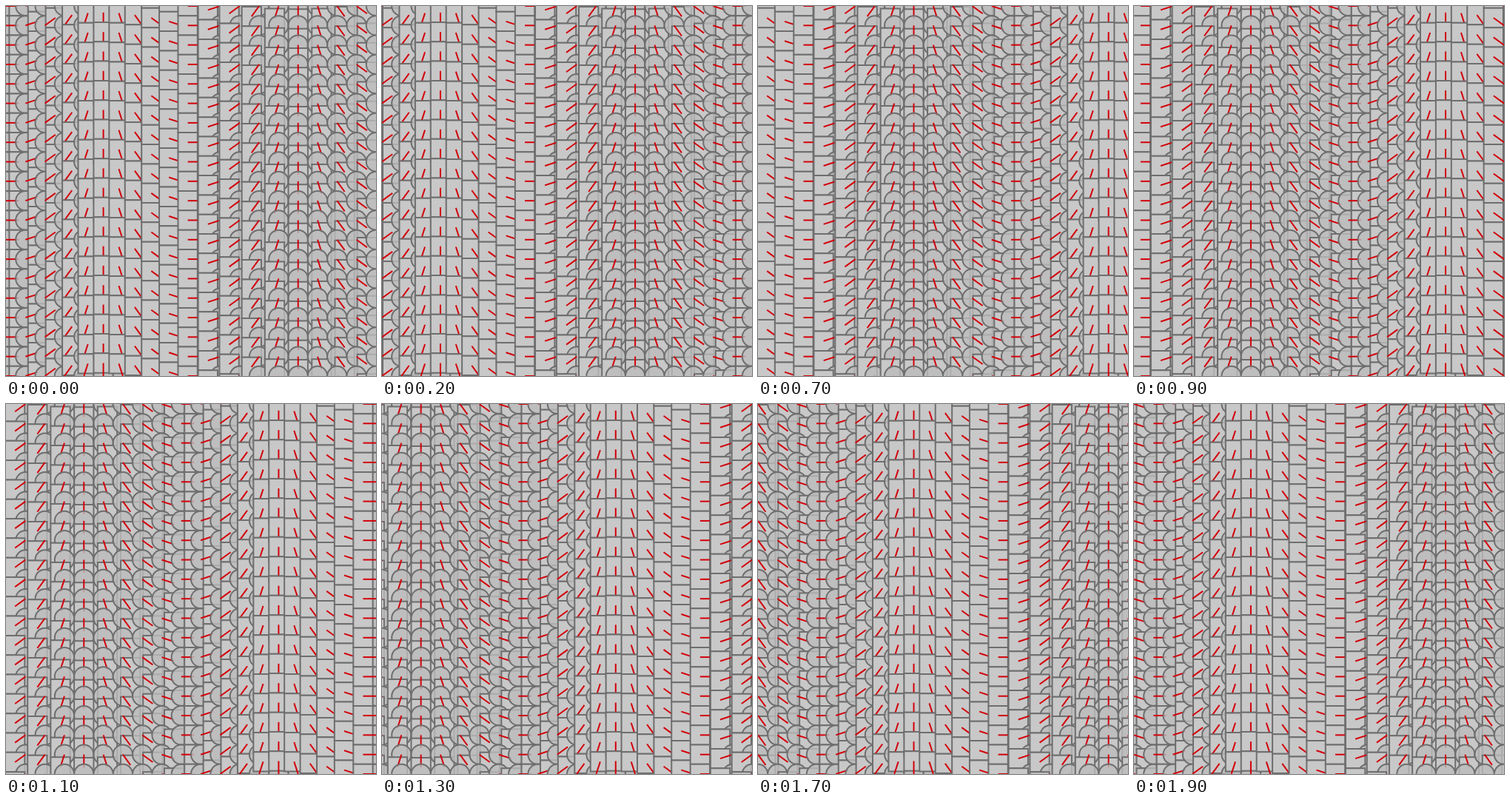
Animation, 500 px wide and 500 px high, one loop 2000 ms. Source, as an HTML page with a canvas:

```html
<!DOCTYPE html>
<html lang="en">
<head>
<meta charset="utf-8">
<title>Shifting tiles</title>
<style>
  html, body { margin: 0; height: 100%; overflow: hidden; background: #c8c8c8; }
  canvas { display: block; }
</style>
</head>
<body>
<canvas id="stage" width="500" height="500"></canvas>
<script>
const ctx = document.getElementById('stage').getContext('2d');
const COUNT = 20, STEP_MS = 100;
const CELL = 500 / (COUNT - 1), HALF = CELL / 2, REACH = 17.5;

// A translucent disc on the grid, an opaque tile orbiting it, and the arm between them.
function drawCell(x, y, angle) {
  const tileX = x + REACH * Math.cos(angle);
  const tileY = y - REACH * Math.sin(angle);

  ctx.strokeStyle = '#6e6e6e';
  ctx.fillStyle = 'rgba(188, 188, 188, 0.8)';
  ctx.beginPath();
  ctx.arc(x, y, HALF, 0, 2 * Math.PI);
  ctx.fill();
  ctx.stroke();

  ctx.fillStyle = '#c8c8c8';
  ctx.beginPath();
  ctx.rect(tileX - HALF, tileY - HALF, CELL, CELL);
  ctx.fill();
  ctx.stroke();

  ctx.strokeStyle = '#d2000a';
  ctx.beginPath();
  ctx.moveTo(x, y);
  ctx.lineTo(tileX, tileY);
  ctx.stroke();
}

function draw(now) {
  const step = Math.floor(now / STEP_MS) % COUNT;
  ctx.fillStyle = '#c8c8c8';
  ctx.fillRect(0, 0, 500, 500);
  ctx.lineWidth = 2;
  for (let col = 0; col < COUNT; col++) {
    const angle = (col + step) / COUNT * 2 * Math.PI;
    for (let row = 0; row < COUNT; row++) drawCell(col * CELL, row * CELL, angle);
  }
}

const start = performance.now();
function tick() {
  draw(performance.now() - start);
  requestAnimationFrame(tick);
}
tick();
</script>
</body>
</html>
```
